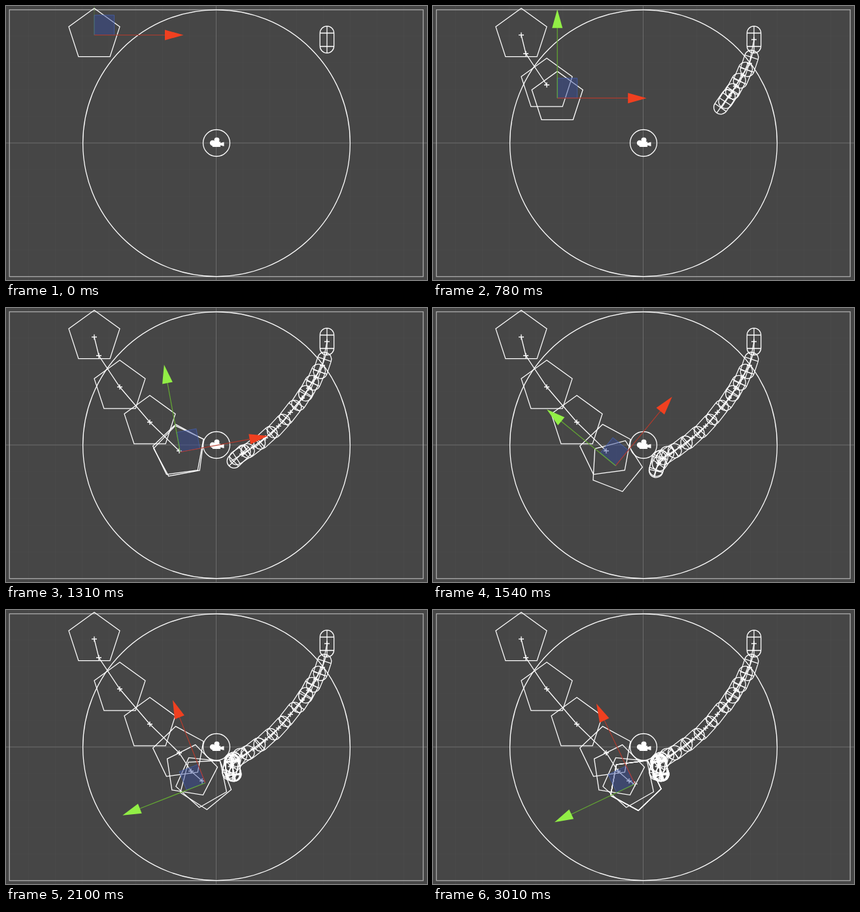
These frames come from a looping animation (644 px wide and 420 px high, 3090 ms). An HTML page:

```html
<!DOCTYPE html>
<html lang="en">
<head>
<meta charset="utf-8">
<title>Rigid body trails</title>
<style>
  html, body { margin: 0; width: 100%; height: 100%; overflow: hidden; background: #464646; }
  svg { display: block; width: 644px; height: 420px; }
  .wire { fill: none; stroke: #fff; stroke-width: 1.3; }
</style>
</head>
<body>
<svg viewBox="0 0 644 420">
  <rect width="644" height="420" fill="#464646"/>
  <path id="grid" fill="none" stroke="#fff" stroke-opacity=".02"/>
  <path d="M0 210H644M321.5 0V420" stroke="#6c6c6c"/>
  <rect x="5.2" y="5.8" width="633" height="409" fill="none" stroke="#b4b4b4" stroke-width="1.2"/>
  <g class="wire">
    <circle cx="322" cy="210.2" r="204.4"/>
    <circle cx="322" cy="210" r="20.5"/>
  </g>
  <g fill="#fff">
    <circle cx="322.5" cy="205.5" r="4"/>
    <circle cx="316" cy="210" r="4.2"/>
    <path d="M314 208H328V210L333.5 208.5V215L328 213.5V216H316Z"/>
  </g>
  <g id="bodies" class="wire"></g>
  <g id="gizmo">
    <path d="M0 0H30.5V-30.5H0Z" fill="#344a9c" fill-opacity=".45" stroke="#4663b4" stroke-opacity=".7"/>
    <path d="M0 0H108" stroke="#b23a2c" stroke-width="1.2"/>
    <path d="M108 -8L136.5 0L108 8Z" fill="#f04020"/>
    <g id="up">
      <path d="M0 0V-108" stroke="#64aa32" stroke-width="1.2"/>
      <path d="M-8 -107.5L0 -136L8 -107.5Z" fill="#92ee46"/>
    </g>
  </g>
</svg>
<script>
const LOOP = 3090, START = 150, RESUME = 380, STEP = 77.3;
const el = id => document.getElementById(id);
const clamp = v => Math.min(1, Math.max(0, v));

const pentagonCorners = [0, 1, 2, 3, 4].map(i => {
  const a = i * Math.PI * 0.4;
  return `${41 * Math.sin(a)} ${-41 * Math.cos(a)}`;
});

// The body passes points[0] at 0 and each later point one interval after "first".
const pentagon = {
  first: 323, interval: 323,
  points: [[135, 44.5], [142, 73], [174, 121], [220, 175],
           [265, 219], [283, 247], [300, 262], [308.7, 266.7]],
  outline: `M${pentagonCorners.join('L')}Z`,
  hasGhost: i => i !== 1,
  angle: t => -115.5 * Math.sin(clamp((t - 1250) / 1000) * Math.PI / 2)
};
const capsule = {
  first: 400, interval: 107,
  points: [[491, 51.5], [484, 88], [474, 106], [463, 123], [453, 138], [435, 160], [417, 181],
           [397, 199], [378, 213], [361, 224], [352, 231], [345, 238], [343.5, 240], [347, 242]],
  outline: 'M-10.7 -10A10.7 10.7 0 0 1 10.7 -10V10A10.7 10.7 0 0 1 -10.7 10Z' +
           'M-10.7 -10H10.7M-10.7 10.5H10.7M0 -20.7V20.7',
  hasGhost: () => true,
  angle: t => t < 1256 ? 57 * t / 1256 : -19 + 76 * Math.exp((1256 - t) / 328)
};

// Catmull-Rom interpolation between b and c
const spline = (a, b, c, d, u) =>
  b + u / 2 * (c - a + u * (2 * a - 5 * b + 4 * c - d + u * (3 * (b - c) + d - a)));

function poseAt({ first, interval, points, angle }, t) {
  const s = t < first ? t / first : 1 + (t - first) / interval;
  const i = Math.floor(s);
  const point = k => points[Math.min(points.length - 1, Math.max(0, k))];
  const axis = n => spline(...[-1, 0, 1, 2].map(k => point(i + k)[n]), s - i);
  return { x: axis(0), y: axis(1), angle: angle(t) };
}

const place = p => `translate(${p.x} ${p.y}) rotate(${p.angle})`;

function drawBody(body, t) {
  const marks = [];
  for (let m = 0; m < t; m = m ? m + body.interval : body.first) marks.push(poseAt(body, m));
  const shapes = [...marks.filter((_, i) => body.hasGhost(i)), poseAt(body, t)]
    .map(p => `<path d="${body.outline}" transform="${place(p)}"/>`).join('');
  if (!marks.length) return shapes;
  const trail = 'M' + marks.map(p => `${p.x} ${p.y}`).join('L');
  const crosses = marks.map(p => `M${p.x - 4} ${p.y}h8M${p.x} ${p.y - 4}v8`).join('');
  return shapes + `<path d="${trail}${crosses}"/>`;
}

function render(t) {
  el('bodies').innerHTML = drawBody(pentagon, t) + drawBody(capsule, t);
  el('gizmo').setAttribute('transform', place(poseAt(pentagon, t)));
  el('up').setAttribute('opacity', t ? 1 : 0.3);
}

// The first motion step jumps ahead and stalls; then steps are even.
function stepTime(now) {
  if (now < START) return 0;
  if (now < RESUME) return 340;
  return RESUME + Math.floor((now - RESUME) / STEP) * STEP;
}

let grid = '';
for (let i = -7; i <= 7; i++) grid += `M${321.5 + 41 * i} 0V420M0 ${210 + 41 * i}H644`;
el('grid').setAttribute('d', grid);

let shown = -1;
function tick() {
  const t = stepTime(performance.now() % LOOP);
  if (t !== shown) render(shown = t);
  requestAnimationFrame(tick);
}
tick();
</script>
</body>
</html>
```
